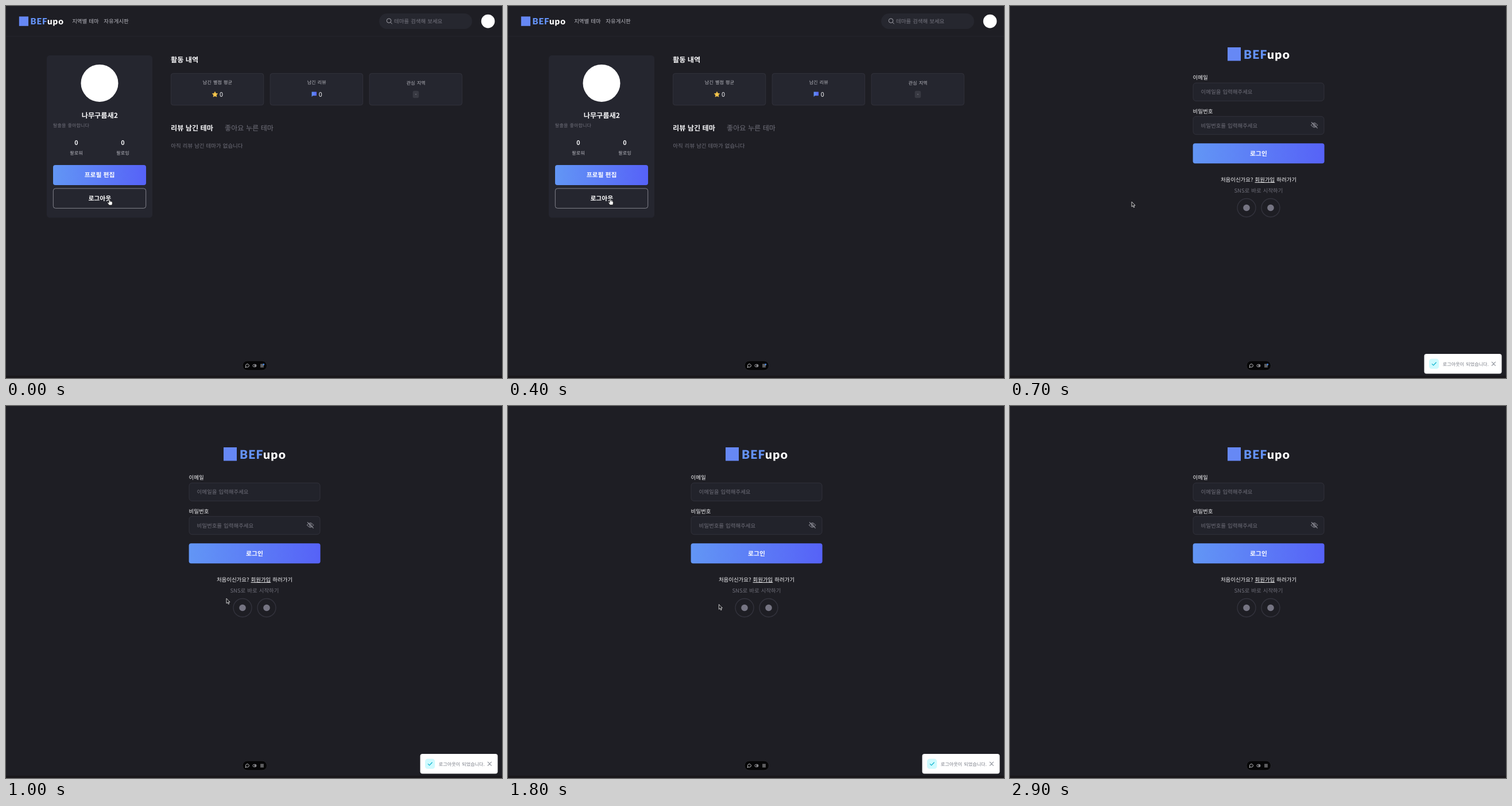
These frames come from a looping animation (864 by 648 pixels, 3000 ms). An HTML page:

```html
<!DOCTYPE html>
<html lang="ko">
<head>
<meta charset="utf-8">
<style>
  html, body { margin: 0; width: 100%; height: 100%; overflow: hidden; background: #1e1e24; }
  svg { display: block; width: 864px; height: 648px; }
  text { font-family: "Noto Sans CJK KR", "Noto Sans CJK", "Noto Sans", sans-serif; text-rendering: geometricPrecision; white-space: pre; }
  .brand { font-family: Lato, sans-serif; font-weight: 900; }
  .line { fill: none; stroke-linecap: round; stroke-linejoin: round; }
</style>
</head>
<body>
<svg id="stage" viewBox="0 0 864 648">
  <defs>
    <linearGradient id="blue">
      <stop offset="0" stop-color="#6296f5"/>
      <stop offset="1" stop-color="#5662f7"/>
    </linearGradient>
  </defs>
  <rect width="864" height="648" fill="#1e1e24"/>
  <rect y="644" width="864" height="4" fill="#19171b"/>
  <g id="profile"></g>
  <g id="login"></g>
  <g id="toolbar"></g>
  <g id="toast"></g>
  <g id="arrow"><path d="M0 0V8.6L2 6.8L3.4 10L4.8 9.4L3.4 6.3H6Z" fill="#16161a" stroke="#f4f4f4" stroke-width=".8" stroke-linejoin="round"/></g>
  <g id="hand"><path d="M-.9 .6Q0-.5 .9 .6V4.2Q1.7 3.5 2.4 4.4Q3.3 3.8 3.9 4.8Q5.2 4.5 5.2 6V8.3Q5 9.8 4.2 10.9H-.4Q-1.4 9.2-3 7.2Q-3.7 5.9-2.4 5.8L-.9 7Z" fill="#fff" stroke="#111" stroke-width=".7" stroke-linejoin="round"/></g>
</svg>
<script>
const NS = "http://www.w3.org/2000/svg";
const $ = id => document.getElementById(id);

function add(parent, tag, attrs) {
  const el = document.createElementNS(NS, tag);
  for (const key in attrs) el.setAttribute(key, attrs[key]);
  parent.appendChild(el);
  return el;
}

const rect = (g, x, y, width, height, rx, fill, stroke = "none") =>
  add(g, "rect", { x, y, width, height, rx, fill, stroke, "stroke-width": .8 });
const circle = (g, cx, cy, r, fill, stroke = "none", width = 1) =>
  add(g, "circle", { cx, cy, r, fill, stroke, "stroke-width": width });
const line = (g, d, stroke, width = 1) =>
  add(g, "path", { d, stroke, "stroke-width": width, class: "line" });

// y is the optical middle of the line
function label(g, str, x, y, size, fill, weight = 400, anchor = "start") {
  const el = add(g, "text", {
    x, y: y + size * .37, fill, "font-size": size, "font-weight": weight, "text-anchor": anchor,
    "word-spacing": Math.max(0, 1 - (size - 8.1) * .42)
  });
  el.textContent = str;
  return el;
}
const mid = (g, str, x, y, size, fill, weight) => label(g, str, x, y, size, fill, weight, "middle");

function brand(g, x, base, size) {
  const el = add(g, "text", { x, y: base, class: "brand", "font-size": size, "letter-spacing": size * .06 });
  add(el, "tspan", { fill: "#6492f6" }).textContent = "BEF";
  add(el, "tspan", { fill: "#fff" }).textContent = "upo";
}

const XS = 8.1, SM = 9.45, MD = 10.8, LG = 12.15;
const WHITE = "#f8f8fa", SOFT = "#b9b9c0", DIM = "#70707b", CARD = "#25262f", EDGE = "#363741";

function buildProfile(g) {
  rect(g, 22.8, 18.3, 16.2, 16.5, 0, "#6688f5");
  brand(g, 42.5, 32.4, 15.1);
  label(g, "지역별 테마", 115.2, 26.6, SM, SOFT);
  label(g, "자유게시판", 170.3, 26.6, SM, SOFT);
  rect(g, 650, 13, 162, 27, 13.5, "#26272f");
  circle(g, 667, 25.6, 3.8, "none", "#a5a5ad");
  line(g, "M669.8 28.4L672.3 31", "#a5a5ad");
  label(g, "테마를 검색해 보세요", 676, 26.6, SM, "#777781");
  circle(g, 839.6, 26.6, 11.8, "#fff");
  rect(g, 0, 52.5, 864, 1, 0, "#25252c");

  rect(g, 71, 86, 184, 282.8, 5.4, CARD);
  circle(g, 163, 134.4, 32.5, "#fff");
  mid(g, "나무구름새2", 163.3, 190.6, LG, WHITE, 700);
  label(g, "탈출을 좋아합니다", 82, 208.3, XS, DIM);
  [["팔로워", 122.5], ["팔로잉", 203.5]].forEach(([name, x]) => {
    mid(g, "0", x, 238, MD, WHITE, 700);
    mid(g, name, x, 255.7, XS, SOFT);
  });
  rect(g, 82, 277, 162, 35.1, 4, "url(#blue)");
  mid(g, "프로필 편집", 163, 294.5, MD, "#fff", 700);
  rect(g, 82.3, 317.9, 161.4, 34.4, 4, "none", "#9c9ca5");
  mid(g, "로그아웃", 163.3, 335.2, MD, "#fff", 700);

  label(g, "활동 내역", 287, 93.2, LG, WHITE, 700);
  ["남긴 별점 평균", "남긴 리뷰", "관심 지역"].forEach((name, i) => {
    const x = 287.4 + i * 172.8;
    rect(g, x, 117.4, 161.4, 55.3, 4, CARD, EDGE);
    mid(g, name, x + 81, i === 2 ? 134.2 : 133.2, XS, SOFT);
  });
  let star = "";
  for (let k = 0; k < 10; k++) {
    const r = k % 2 ? 2.5 : 5, a = k * Math.PI / 5 - Math.PI / 2;
    star += `${364 + r * Math.cos(a)},${154.2 + r * Math.sin(a)} `;
  }
  add(g, "polygon", { points: star, fill: "#f7c64b", stroke: "#f7c64b", "stroke-width": .6, "stroke-linejoin": "round" });
  add(g, "path", { d: "M532.6 149.5H541V156.3H534.5L532.6 158.2Z", fill: "url(#blue)" });
  mid(g, "0", 375, 154.5, MD, WHITE, 500);
  mid(g, "0", 547.8, 154.5, MD, WHITE, 500);
  rect(g, 708.6, 147.7, 10.6, 12.6, 2.7, "#383942");
  mid(g, "-", 714, 154.5, XS, SOFT);

  label(g, "리뷰 남긴 테마", 287, 212.8, LG, WHITE, 700);
  label(g, "좋아요 누른 테마", 381, 212.8, LG, DIM);
  label(g, "아직 리뷰 남긴 테마가 없습니다", 287.3, 243.2, SM, DIM);
}

function buildLogin(g) {
  label(g, "이메일", 318.6, 125, SM, WHITE, 500);
  rect(g, 319, 134, 228, 31.4, 5, "#22232b", EDGE);
  label(g, "이메일을 입력해주세요", 332.6, 149.7, SM, DIM);
  label(g, "비밀번호", 318.6, 183.3, SM, WHITE, 500);
  rect(g, 319, 192.3, 228, 31.4, 5, "#22232b", EDGE);
  label(g, "비밀번호를 입력해주세요", 332.6, 208.2, SM, DIM);
  rect(g, 318.6, 239.2, 229, 35, 4, "url(#blue)");
  mid(g, "로그인", 433, 257.2, MD, "#fff", 700);

  const join = mid(g, "처음이신가요? ", 433, 302.4, SM, WHITE, 500);
  add(join, "tspan", { "text-decoration": "underline" }).textContent = "회원가입";
  add(join, "tspan", {}).textContent = " 하러가기";
  mid(g, "SNS로 바로 시작하기", 433, 322, SM, DIM);
  for (const x of [412, 454]) circle(g, x, 351.5, 16, "none", "#34343e", 1.3);

  const images = add(g, "g", {});
  rect(images, 379, 72, 23, 23.5, 0, "#6688f5");
  brand(images, 407, 91.6, 21);
  line(images, "M524.5 207.5Q530 199.5 535.8 207.5Q530 215.5 524.5 207.5Z", "#9696a0");
  circle(images, 530.1, 207.5, 1.9, "none", "#9696a0");
  line(images, "M525.3 202.6L535.3 212.6", "#9696a0", 1.1);
  for (const x of [412, 454]) circle(images, x, 351.5, 5.8, "#757482");
  return images;
}

function buildToolbar(g) {
  rect(g, 412, 618, 42.5, 16.8, 8.4, "#060607", "#2c2c31");
  line(g, "M417.2 629.5L417.7 627.6A3 2.8 0 1 1 419.2 629Z", "#d8d8dc", .9);
  rect(g, 430, 624.3, 6.2, 4.4, 2.2, "none", "#c4c4c9");
  circle(g, 433.9, 626.5, 1.2, "#c4c4c9");
  line(g, "M443.5 624.3H448.5M443.5 626.5H448.5M443.5 628.7H448.5", "#d4d4d9", .9);
  return circle(g, 448.7, 624.4, 1.4, "#4a90f5");
}

function buildToast(g) {
  rect(g, 721.5, 606, 135, 34.5, 4, "#fff");
  rect(g, 730, 614.6, 17.2, 17.4, 4.5, "#cffafe");
  line(g, "M735.3 623.6L737.6 625.9L742.2 621", "#0cb2cf", 1.2);
  label(g, "로그아웃이 되었습니다.", 753.8, 623.6, XS, "#777b85");
  line(g, "M839.3 620.2L845.5 626.4M845.5 620.2L839.3 626.4", "#8a8e97", 1.1);
}

buildProfile($("profile"));
const images = buildLogin($("login"));
const dot = buildToolbar($("toolbar"));
buildToast($("toast"));

const LOOP = 3000, STEP = 100;
// pointer path: time, x, y
const PATH = [
  [0, 180, 336], [400, 178, 335.6], [500, 178, 335.6], [600, 177.8, 336],
  [700, 212, 341], [800, 290, 345], [900, 356, 340], [1000, 384, 335.2], [1100, 384, 335.2],
  [1700, 376.4, 341.8], [1800, 367.4, 345.6], [1900, 358, 322],
  [2000, 348, 250], [2100, 339, 113]
];

function pointerAt(t) {
  const i = PATH.findIndex(p => p[0] > t);
  if (i < 0) return PATH[PATH.length - 1].slice(1);
  const [t0, x0, y0] = PATH[i - 1], [t1, x1, y1] = PATH[i];
  const k = (t - t0) / (t1 - t0);
  return [x0 + (x1 - x0) * k, y0 + (y1 - y0) * k];
}

const show = (el, on) => el.setAttribute("display", on ? "inline" : "none");

function draw(ms) {
  const t = Math.floor((ms % LOOP) / STEP) * STEP;
  const out = t >= 600;
  show($("profile"), !out);
  show($("login"), out);
  show(images, t >= 700);
  show(dot, t < 800);
  show($("toast"), out && t < 2900);

  const [x, y] = pointerAt(t);
  const overButton = !out || (y > 239 && y < 274);
  show($("hand"), t < 2200 && overButton);
  show($("arrow"), t < 2200 && !overButton);
  for (const id of ["hand", "arrow"]) $(id).setAttribute("transform", `translate(${x} ${y})`);
}

const start = performance.now();
function tick() {
  draw(performance.now() - start);
  requestAnimationFrame(tick);
}
tick();
</script>
</body>
</html>
```
